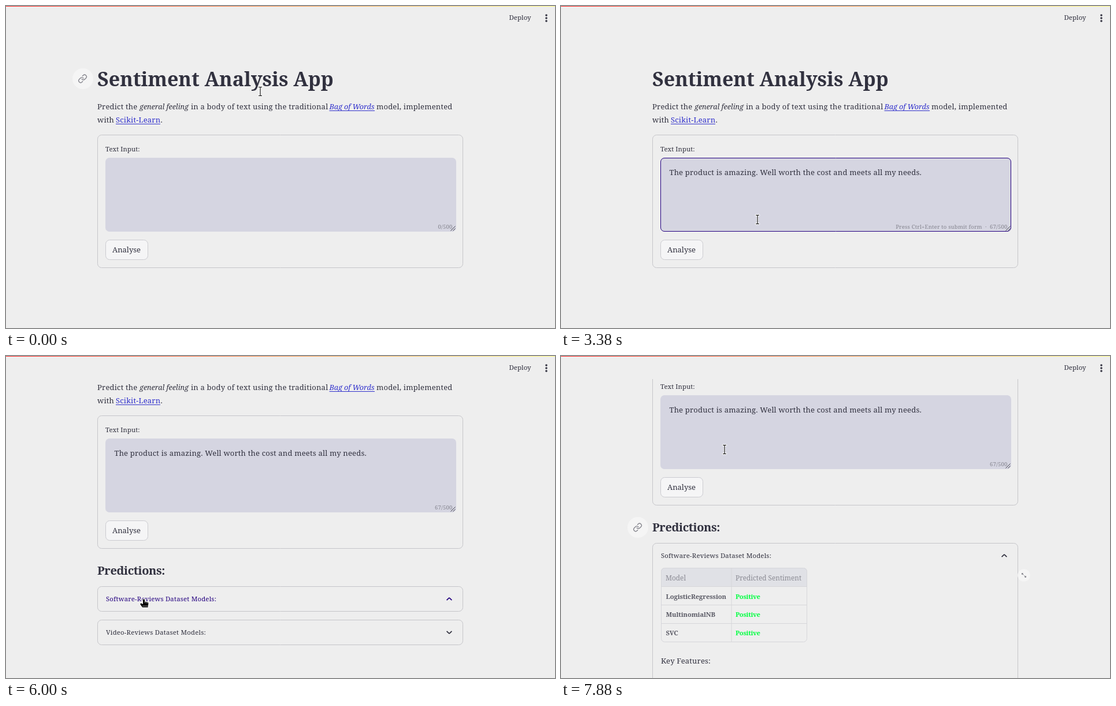
An HTML page with a canvas for the animation above (8000 ms loop, 950x558 px).

```html
<!DOCTYPE html>
<html lang="en">
<head>
<meta charset="utf-8">
<title>Sentiment Analysis App</title>
<style>
html, body { margin: 0; width: 950px; height: 558px; overflow: hidden; background: #eee; }
canvas { display: block; }
</style>
</head>
<body>
<canvas id="stage" width="950" height="558"></canvas>
<script>
const ctx = document.getElementById('stage').getContext('2d');
const LOOP = 8000, TICK = 125;
const INK = '#31313f', PURPLE = '#23007f', LINE = '#c5c5c9', BG = '#eeeeee', GREEN = '#00ff40', LINK = '#3030cc';
const REVIEW = 'The product is amazing. Well worth the cost and meets all my needs.';

// Pointer path: tick, x, y, shape
const pointerPath = [
  [0, 440, 148, 'beam'], [1, 440, 148, 'beam'], [3, 445, 162, 'beam'], [4, 449, 188, 'beam'],
  [5, 448, 214, 'arrow'], [6, 440, 252, 'arrow'], [7, 428, 280, 'beam'], [8, 424, 289, 'beam'],
  [14, 424, 289, 'beam'], [15, 424, 290, 'beam'], [22, 424, 290, 'beam'], [24, 400, 318, 'beam'],
  [27, 340, 370, 'beam'], [28, 312, 390, 'beam'], [29, 275, 414, 'arrow'], [30, 242, 421, 'hand'],
  [31, 237, 422, 'hand'], [43, 237, 421, 'arrow'], [45, 237, 421, 'hand'], [46, 238, 421, 'hand'],
  [48, 240, 421, 'hand'], [49, 239, 421, 'arrow'], [52, 237, 420, 'arrow'], [57, 237, 420, 'arrow'],
  [60, 241, 400, 'arrow'], [61, 247, 372, 'arrow'], [62, 259, 300, 'beam'], [63, 283, 162, 'beam']
];
const scrollPath = [[0, 0], [41, 0], [43, 42], [44, 108], [45, 118], [46, 120], [49, 120], [50, 146], [51, 172], [52, 189], [53, 195]];
const openPath = [[0, 0], [48, 0], [49, 12], [50, 42], [51, 86], [52, 137], [53, 240]];
const toolPath = [[0, 0], [50, 0], [52, 1], [61, 1], [62, 0.9], [63, 0.6]];

function along(path, n, col = 1) {
  let i = path.length - 1;
  while (i && path[i][0] > n) i--;
  const a = path[i], b = path[i + 1];
  return b ? a[col] + (b[col] - a[col]) * (n - a[0]) / (b[0] - a[0]) : a[col];
}

function text(s, x, y, size, color = INK, style = '', gap = 0, align = 'left') {
  ctx.font = `${style} ${size}px "Noto Serif", serif`;
  ctx.letterSpacing = gap + 'px';
  ctx.textAlign = align;
  ctx.fillStyle = color;
  ctx.fillText(s, x, y);
}

const body = (s, x, y, color = INK) => text(s, x, y, 13, color, '', 0.2);
const slanted = (s, x, y, color = INK) => text(s, x, y, 12.6, color, 'italic', -0.05);

function box(x, y, w, h, r, fill, stroke) {
  ctx.beginPath();
  ctx.roundRect(x, y, w, h, r);
  if (fill) { ctx.fillStyle = fill; ctx.fill(); }
  if (stroke) { ctx.strokeStyle = stroke; ctx.lineWidth = 1; ctx.stroke(); }
}

function dot(x, y, r, color) {
  ctx.fillStyle = color;
  ctx.beginPath();
  ctx.arc(x, y, r, 0, 7);
  ctx.fill();
}

function lines(color, width, ...pts) {
  ctx.strokeStyle = color;
  ctx.lineWidth = width;
  ctx.beginPath();
  for (const [x1, y1, x2, y2] of pts) { ctx.moveTo(x1, y1); ctx.lineTo(x2, y2); }
  ctx.stroke();
}

const chain = new Path2D('M10 13a5 5 0 0 0 7.54.54l3-3a5 5 0 0 0-7.07-7.07l-1.72 1.71M14 11a5 5 0 0 0-7.54-.54l-3 3a5 5 0 0 0 7.07 7.07l1.71-1.71');
function anchor(x, y) {
  dot(x, y, 18, '#f5f5f5');
  ctx.save();
  ctx.translate(x - 8.6, y - 8.2);
  ctx.scale(0.68, 0.68);
  ctx.strokeStyle = '#85858d';
  ctx.lineWidth = 2;
  ctx.lineCap = 'round';
  ctx.stroke(chain);
  ctx.restore();
}

const expand = new Path2D('M-6.5-6.2H-1.6L-3.3-4.5-.6-1.8-1.8-.6-4.5-3.3-6.5-1.4ZM6.5 6.2H1.6L3.3 4.5 .6 1.8 1.8.6 4.5 3.3 6.5 1.4Z');
function toolbar(x, y, k) {
  if (!k) return;
  ctx.save();
  ctx.translate(x, y);
  ctx.scale(k, k);
  dot(0, 0, 18, '#f5f5f5');
  ctx.fillStyle = '#71717a';
  ctx.fill(expand);
  ctx.restore();
}

function chevron(y, dir, color) {
  lines(color, 1.7, [762.6, y - 2.2 * dir, 767, y + 2.2 * dir], [767, y + 2.2 * dir, 771.4, y - 2.2 * dir]);
}

function intro() {
  text('Sentiment Analysis App', 158, 139, 34, INK, 'bold', -0.05);
  body('Predict the', 158, 179);
  slanted('general feeling', 231, 179);
  body('in a body of text using the traditional', 320, 179);
  slanted('Bag of Words', 559.5, 179, LINK);
  body('model, implemented', 641, 179);
  body('with', 158, 202);
  body('Scikit-Learn', 190, 202, LINK);
  body('.', 267.5, 202);
  lines(LINK, 1, [559.5, 181.5, 638, 181.5], [190, 204.5, 267, 204.5]);
}

function form(n) {
  const focus = n >= 12 && n < 33, pasted = n >= 18, hover = n >= 30 && n < 43;
  box(158.5, 223.5, 632, 230, 7, null, LINE);
  text('Text Input:', 172, 252, 11.3, INK, '', 0.1);
  box(172, 263, 607, 128, 7, '#d5d5e1');
  if (focus) box(172.5, 263.5, 606, 127, 6.5, null, PURPLE);
  if (pasted) body(REVIEW, 187.5, 293);
  if (n >= 12 && n < 16) lines(INK, 1, [188.5, 278, 188.5, 298]);
  if (n >= 18 && n < 23 || n >= 28 && n < 33) lines(INK, 1, [625.5, 278, 625.5, 298]);
  const count = pasted ? '67/500' : '0/500';
  text(pasted && focus ? 'Press Ctrl+Enter to submit form  ·  ' + count : count, 772.5, 386, 9.5, '#85858f', '', 0.2, 'right');
  lines('#42424c', 1, [769.5, 389.5, 777.5, 381.5], [773.5, 389.5, 777.5, 385.5]);
  box(172.5, 405.5, 73, 34, 7, '#f5f5f6', hover ? PURPLE : '#cbcbd0');
  text('Analyse', 184, 427, 13, hover ? PURPLE : INK);
}

function table() {
  const rows = ['LogisticRegression', 'MultinomialNB', 'SVC'];
  box(173, 562, 253, 32, [6, 6, 0, 0], '#e0e1e6');
  lines('#d6d6da', 1, [173, 594.5, 426, 594.5], [173, 626.5, 426, 626.5], [173, 658.5, 426, 658.5], [295, 562, 295, 690]);
  box(173.5, 562.5, 252, 128, 6, null, '#d6d6da');
  text('Model', 181, 584, 11.8, '#8b8b94');
  text('Predicted Sentiment', 302, 584, 11.8, '#8b8b94');
  rows.forEach((name, i) => {
    const y = 615.5 + i * 31.6;
    text(name, 181.5, y, 11.2, '#5a5a65', '600', -0.1);
    text('Positive', 302, y, 11.2, GREEN, '600', -0.3);
  });
}

function panel(y, h, title, open, color) {
  box(158.5, y + 0.5, 632, h, 7, null, LINE);
  text(title, 173, y + 26, 11.3, color, '', 0.22);
  chevron(y + 22, open ? -1 : 1, color);
}

function results(n) {
  const grow = along(openPath, n);
  if (n >= 34) text('Predictions:', 158, 499, 20, INK, '600', -0.4);
  if (n < 35) return;
  panel(519, 43 + grow, 'Software-Reviews Dataset Models:', n >= 48, n >= 45 && n < 49 ? PURPLE : INK);
  panel(577 + grow, 43, 'Video-Reviews Dataset Models:', false, INK);
  if (n < 50) return;
  table();
  body('Key Features:', 173, 728);
  toolbar(801, 575, along(toolPath, n));
}

function header() {
  ctx.fillStyle = BG;
  ctx.fillRect(0, 0, 950, 40);
  const bar = ctx.createLinearGradient(0, 0, 950, 0);
  bar.addColorStop(0, '#ff2b2b');
  bar.addColorStop(0.5, '#ff9a52');
  bar.addColorStop(1, '#fffd80');
  ctx.fillStyle = bar;
  ctx.fillRect(0, 0, 950, 1);
  text('Deploy', 870.5, 24, 11.5);
  for (const y of [16, 21, 26]) dot(935, y, 1.8, INK);
}

const arrowShape = new Path2D('M0 0V15.4L3.6 12 6.1 17.8 8.9 16.6 6.4 11H11.2Z');
const handShape = new Path2D('M-3 1Q-1.6-.4 0 1V4.6L5 5.4Q6.6 6 6.4 8L5.6 14.4H-4L-7.6 9.4Q-8 7.4-6 7.6L-3 9Z');
function pointer(n) {
  const shape = pointerPath.filter(p => p[0] <= n).pop()[3];
  ctx.save();
  ctx.translate(along(pointerPath, n, 1), along(pointerPath, n, 2));
  ctx.lineJoin = 'round';
  if (shape === 'beam') {
    for (const [color, w, e] of [['#fff', 3, 1], ['#000', 1.1, 0]])
      lines(color, w, [0, -7.5, 0, 7.5], [-3 - e, -7.5, 3 + e, -7.5], [-3 - e, 7.5, 3 + e, 7.5]);
  } else {
    const path = shape === 'hand' ? handShape : arrowShape;
    ctx.strokeStyle = '#fff';
    ctx.lineWidth = 2;
    ctx.stroke(path);
    ctx.fillStyle = '#000';
    ctx.fill(path);
    if (shape === 'hand') lines('#fff', 0.6, [0, 4.6, 0, 7], [2.2, 5, 2.2, 7.4], [4.4, 5.4, 4.4, 7.8], [-4, 12.2, 5.8, 12.2]);
  }
  ctx.restore();
}

function draw(ms) {
  const n = Math.floor(ms % LOOP / TICK);
  ctx.fillStyle = BG;
  ctx.fillRect(0, 0, 950, 558);
  ctx.save();
  ctx.translate(0, -Math.round(along(scrollPath, n)));
  if (n < 4) anchor(133, 126);
  if (n >= 62) anchor(133, 492);
  intro();
  form(n);
  results(n);
  ctx.restore();
  header();
  pointer(n);
}

const start = performance.now();
function frame() {
  draw(performance.now() - start);
  requestAnimationFrame(frame);
}
draw(0);
requestAnimationFrame(frame);
</script>
</body>
</html>
```
